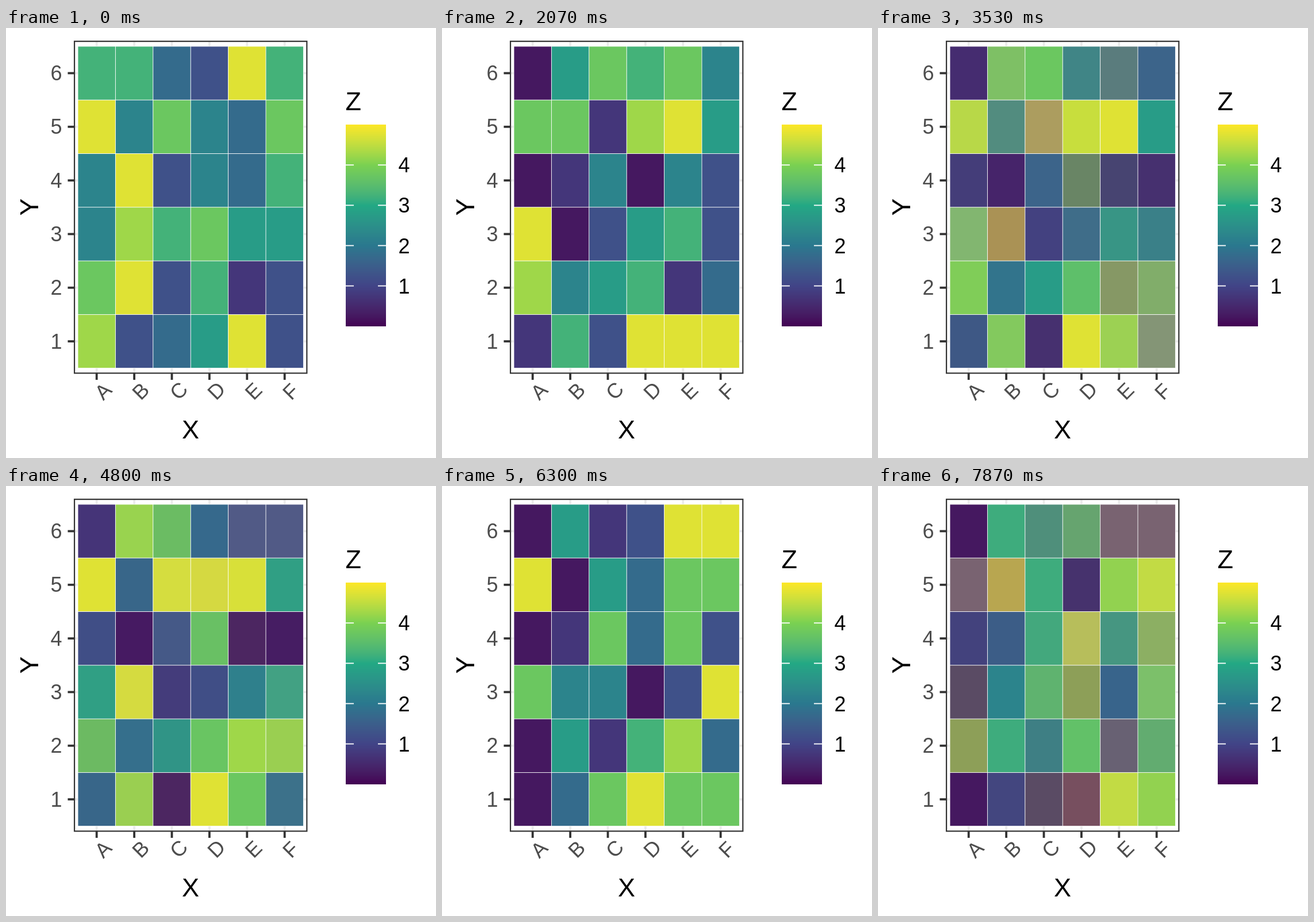
These frames come from a looping animation (748 px wide and 748 px high, 8 s). An HTML page with a canvas:

```html
<!DOCTYPE html>
<html lang="en">
<head>
<meta charset="utf-8">
<title>Heatmap</title>
<style>
html, body { margin: 0; width: 100%; height: 100%; overflow: hidden; background: #fff; }
canvas { display: block; width: 748px; height: 748px; }
</style>
</head>
<body>
<canvas id="stage" width="748" height="748"></canvas>
<script>
const ctx = document.getElementById('stage').getContext('2d');
const LOOP = 8000;
const FONT = '"Liberation Sans", Arial, sans-serif';
const DARK = '#333333', GREY = '#4d4d4d', BLACK = '#000';
const N = 6;
const tiles = { x: 125, y: 31.9, w: 65.4, h: 93.3 };
const pad = 0.1;
const panel = {
  x: tiles.x - pad * tiles.w, y: tiles.y - pad * tiles.h,
  w: (N + 2 * pad) * tiles.w, h: (N + 2 * pad) * tiles.h
};
const bar = { x: 591, y: 168, w: 70, h: 351 };

// Rest states, rows from the top down; each digit is a cell's tenth of the scale.
const states = [
  '663296 947437 492436 486755 792612 823592',
  '057674 771895 014042 902562 845613 162999',
  '187322 939995 202700 591245 735788 380973',
  '051299 905377 017372 744029 051683 037977',
  '066711 196089 235948 047836 865717 010098'
].map(s => [...s.replace(/ /g, '')].map(d => (+d + 0.5) / 10));

// Start and end of the linear fade from each state to the next.
const fades = [[670, 2070], [2710, 4090], [4800, 6300], [6890, 8300]];

const mix = (a, b, p) => a + (b - a) * p;
const mixAll = (a, b, p) => a.map((v, i) => mix(v, b[i], p));
const clamp = v => Math.min(1, Math.max(0, v));

function toLab(hex) {
  const [r, g, b] = [1, 3, 5].map(i => {
    const c = parseInt(hex.slice(i, i + 2), 16) / 255;
    return c <= 0.04045 ? c / 12.92 : ((c + 0.055) / 1.055) ** 2.4;
  });
  const f = t => t > 0.008856 ? Math.cbrt(t) : 7.787 * t + 16 / 116;
  const x = f((0.4124 * r + 0.3576 * g + 0.1805 * b) / 0.9505);
  const y = f(0.2126 * r + 0.7152 * g + 0.0722 * b);
  const z = f((0.0193 * r + 0.1192 * g + 0.9505 * b) / 1.089);
  return [116 * y - 16, 500 * (x - y), 200 * (y - z)];
}

function toRgb([L, a, b]) {
  const inv = t => t > 0.2069 ? t ** 3 : (t - 16 / 116) / 7.787;
  const fy = (L + 16) / 116;
  const x = 0.9505 * inv(fy + a / 500), y = inv(fy), z = 1.089 * inv(fy - b / 200);
  const rgb = [
    3.2406 * x - 1.5372 * y - 0.4986 * z,
    -0.9689 * x + 1.8758 * y + 0.0415 * z,
    0.0557 * x - 0.204 * y + 1.057 * z
  ].map(c => {
    const v = c <= 0.0031308 ? 12.92 * c : 1.055 * c ** (1 / 2.4) - 0.055;
    return Math.round(255 * clamp(v));
  });
  return `rgb(${rgb})`;
}

const stops = ['#440154', '#414487', '#2A788E', '#22A884', '#7AD151', '#FDE725'].map(toLab);

function scale(v) {
  const pos = clamp(v) * (stops.length - 1);
  const i = Math.min(stops.length - 2, Math.floor(pos));
  return mixAll(stops[i], stops[i + 1], pos - i);
}

function rect(x, y, w, h, color) {
  ctx.fillStyle = color;
  ctx.fillRect(x, y, w, h);
}

function label(text, x, y, size, color, align = 'left', angle = 0) {
  ctx.save();
  ctx.translate(x, y);
  ctx.rotate(angle);
  ctx.font = `${size}px ${FONT}`;
  ctx.textAlign = align;
  ctx.fillStyle = color;
  ctx.fillText(text, 0, 0);
  ctx.restore();
}

function drawTiles(t) {
  const k = Math.max(0, fades.findLastIndex(([start]) => t >= start));
  const [start, end] = fades[k];
  // The first visible step is already one fourteenth of the way.
  const p = t < start ? 0 : mix(1 / 14, 1, clamp((t - start) / (end - start)));
  const { x, y, w, h } = tiles;
  states[k].forEach((v, i) => {
    const color = toRgb(mixAll(scale(v), scale(states[k + 1][i]), p));
    rect(x + i % N * w, y + Math.floor(i / N) * h, w, h, color);
  });
  for (let i = 0; i <= N; i++) {
    rect(x + i * w - 0.45, y, 0.9, N * h, '#fff');
    rect(x, y + i * h - 0.45, N * w, 0.9, '#fff');
  }
}

const tickX = i => tiles.x + (i + 0.5) * tiles.w;
const tickY = i => tiles.y + (i + 0.5) * tiles.h;

function drawGrid() {
  for (let i = 0; i < N; i++) {
    rect(tickX(i) - 1.9, panel.y, 3.8, panel.h, '#ebebeb');
    rect(panel.x, tickY(i) - 1.9, panel.w, 3.8, '#ebebeb');
  }
}

function drawAxes() {
  ctx.strokeStyle = DARK;
  ctx.lineWidth = 2.2;
  ctx.strokeRect(panel.x + 0.6, panel.y + 0.6, panel.w - 1.2, panel.h - 1.2);
  for (let i = 0; i < N; i++) {
    rect(tickX(i) - 1.9, panel.y + panel.h, 3.8, 11, DARK);
    rect(panel.x - 11, tickY(i) - 1.9, 11, 3.8, DARK);
    label(N - i, 97.5, tickY(i) + 12.5, 36, GREY, 'right');
    label('ABCDEF'[i], tickX(i) + 11.5, 649, 36, GREY, 'left', -Math.PI / 4);
  }
  label('X', 321, 714, 45, BLACK, 'center');
  label('Y', 56, 311.5, 45, BLACK, 'center', -Math.PI / 2);
}

function drawLegend() {
  label('Z', 590.5, 143, 45, BLACK);
  for (let i = 0; i < bar.h; i++) {
    rect(bar.x, bar.y + i, bar.w, 1, toRgb(scale(1 - (i + 0.5) / bar.h)));
  }
  for (let z = 1; z <= 4; z++) {
    const y = 518.7 - 70.1 * z;
    rect(bar.x, y - 0.9, 14, 1.8, '#fff');
    rect(bar.x + bar.w - 14, y - 0.9, 14, 1.8, '#fff');
    label(z, 682.5, y + 13, 36, BLACK);
  }
}

function draw(now) {
  rect(0, 0, 748, 748, '#fff');
  drawGrid();
  drawTiles(now % LOOP);
  drawAxes();
  drawLegend();
  requestAnimationFrame(draw);
}

draw(performance.now());
</script>
</body>
</html>
```
